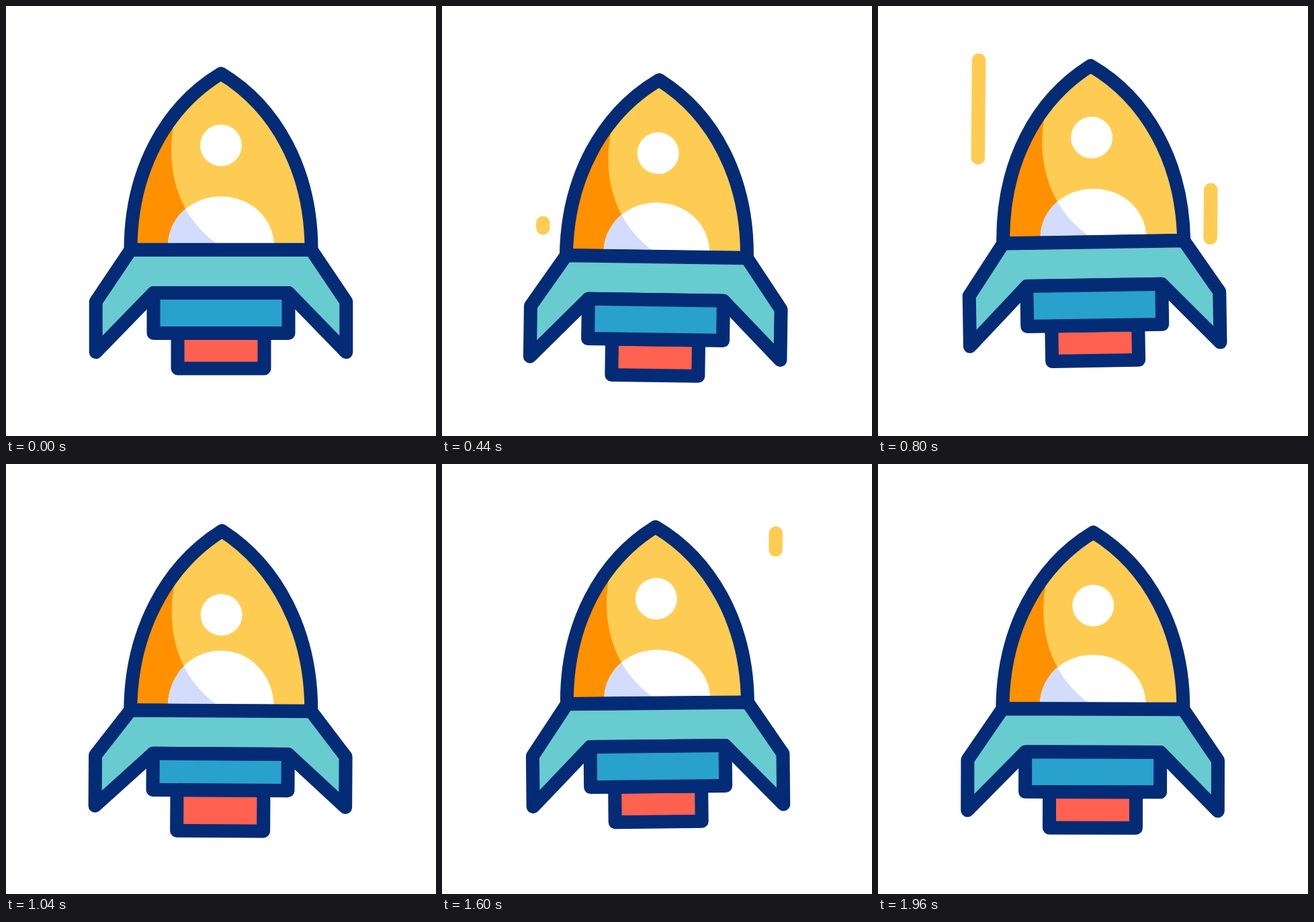
An HTML page that plays this animation: 640x640 px, repeating every 2000 ms.

```html
<!DOCTYPE html>
<html lang="en">
<head>
<meta charset="utf-8">
<title>Rocket</title>
<style>
  html, body { margin: 0; width: 100%; height: 100%; overflow: hidden; background: #fff; }
  svg { display: block; width: 100%; height: 100%; }
  .line { stroke: #042b75; stroke-width: 20; stroke-linejoin: round; stroke-linecap: round; }
  .streak { stroke: #ffcc53; stroke-width: 20.5; stroke-linecap: round; }
</style>
</head>
<body>
<svg viewBox="0 0 640 640">
  <defs>
    <clipPath id="hullClip"><path class="hull"/></clipPath>
    <clipPath id="bodyClip"><path class="body"/></clipPath>
    <path id="shade" d="M251 170C236 240 254 315 320 358V375H150V170Z"/>
  </defs>
  <line class="streak" id="left"/>
  <line class="streak" id="right"/>
  <g id="rocket">
    <path class="hull" fill="#ffcc53"/>
    <g clip-path="url(#hullClip)">
      <use href="#shade" fill="#ff9100"/>
      <path class="body" fill="#fff"/>
      <use href="#shade" fill="#d3dcfd" clip-path="url(#bodyClip)"/>
      <circle id="head" cx="320" r="31" fill="#fff"/>
    </g>
    <path class="hull line" fill="none"/>
    <path class="line" id="nozzle" fill="#ff6150"/>
    <path class="line" id="wings" fill="#68cbd0"/>
    <path class="line" id="engine" fill="#28a1cc"/>
  </g>
</svg>
<script>
const LOOP = 2000, STEP = 40;
const $ = id => document.getElementById(id);
const clamp = v => Math.min(1, Math.max(0, v));
const ease = u => { u = clamp(u); return u * u * (3 - 2 * u); };
const mix = (a, b, u) => a + (b - a) * u;
const setPath = (el, d) => el.setAttribute('d', d);
const setAll = (cls, d) => document.querySelectorAll('.' + cls).forEach(el => setPath(el, d));
const box = (x1, y1, x2, y2) => `M${x1} ${y1}H${x2}V${y2}H${x1}Z`;

// Rocket bob: three swings of 1/3 second per half, easing out of and back to rest
const BOB = [0, -1, 1, -1, 1, -1, 1, 0];
const bobTimes = BOB.map((_, i) => i === 0 ? 0 : i === 7 ? LOOP : (i - 0.5) * LOOP / 6);

function bobAt(t) {
  let i = 0;
  while (i < 6 && t >= bobTimes[i + 1]) i++;
  return mix(BOB[i], BOB[i + 1], ease((t - bobTimes[i]) / (bobTimes[i + 1] - bobTimes[i])));
}

function drawRocket(t) {
  const bob = bobAt(t);
  $('rocket').setAttribute('transform', `translate(0 ${12.3 * bob}) rotate(${bob} 320 320)`);

  const m = ease(1 - Math.abs(t % 400 / 200 - 1));
  const tip = 100.5 - 6 * m;
  const top = 283.5 - 11.2 * m;
  const wing = -11 * m;
  const seam = 487 - 6.5 * m;

  setAll('hull', `M185.5 362.7C185.5 245 ${238} ${150 + (tip - 100.5) / 2} 320 ${tip}` +
    `C402 ${150 + (tip - 100.5) / 2} 454.5 245 454.5 362.7Z`);
  setAll('body', `M241 357C241 ${mix(357, top, 0.56)} 276 ${top} 320 ${top}` +
    `S399 ${mix(357, top, 0.56)} 399 357V375H241Z`);
  $('head').setAttribute('cy', 207.4 + 14.2 * m);
  setPath($('wings'), `M185.5 363L133.7 ${440 + wing}V${515.3 + wing}L219.5 427H420.5` +
    `L506.3 ${515.3 + wing}V${440 + wing}L454.5 363Z`);
  setPath($('engine'), box(219.5, 427, 420.5, seam));
  setPath($('nozzle'), box(255.5, seam, 384.5, 539.5 + 2.5 * m));
}

// Falling streaks: head runs ahead of tail along a fixed track
const STREAKS = [
  { id: 'left', x: 150.3, from: 56, to: 330, head: -97, tail: -31, since: 300 },
  { id: 'right', x: 497.2, from: 103, to: 345, head: -193, tail: -107, since: 0 }
];
const CYCLE = 480, RUN = 167, ANCHOR = 320;

function drawStreaks(t) {
  const p = (t - ANCHOR + 200 + CYCLE) % CYCLE - 200;
  const tilt = 0.5 * (1 - clamp(p / 120));
  for (const s of STREAKS) {
    const el = $(s.id);
    const shown = t >= s.since && t >= 120 && p > s.head && p < s.tail + RUN;
    el.style.display = shown ? '' : 'none';
    el.setAttribute('x1', s.x);
    el.setAttribute('x2', s.x);
    el.setAttribute('y1', mix(s.from, s.to, ease((p - s.tail) / RUN)));
    el.setAttribute('y2', mix(s.from, s.to, ease((p - s.head) / RUN)) + 0.01);
    el.setAttribute('transform', `rotate(${tilt} ${s.x} 56)`);
  }
}

let start = null;
function draw(now) {
  if (start === null) start = now;
  const t = Math.floor(Math.max(0, now - start) % LOOP / STEP) * STEP;
  drawRocket(t);
  drawStreaks(t);
  requestAnimationFrame(() => draw(performance.now()));
}
draw(performance.now());
</script>
</body>
</html>
```
